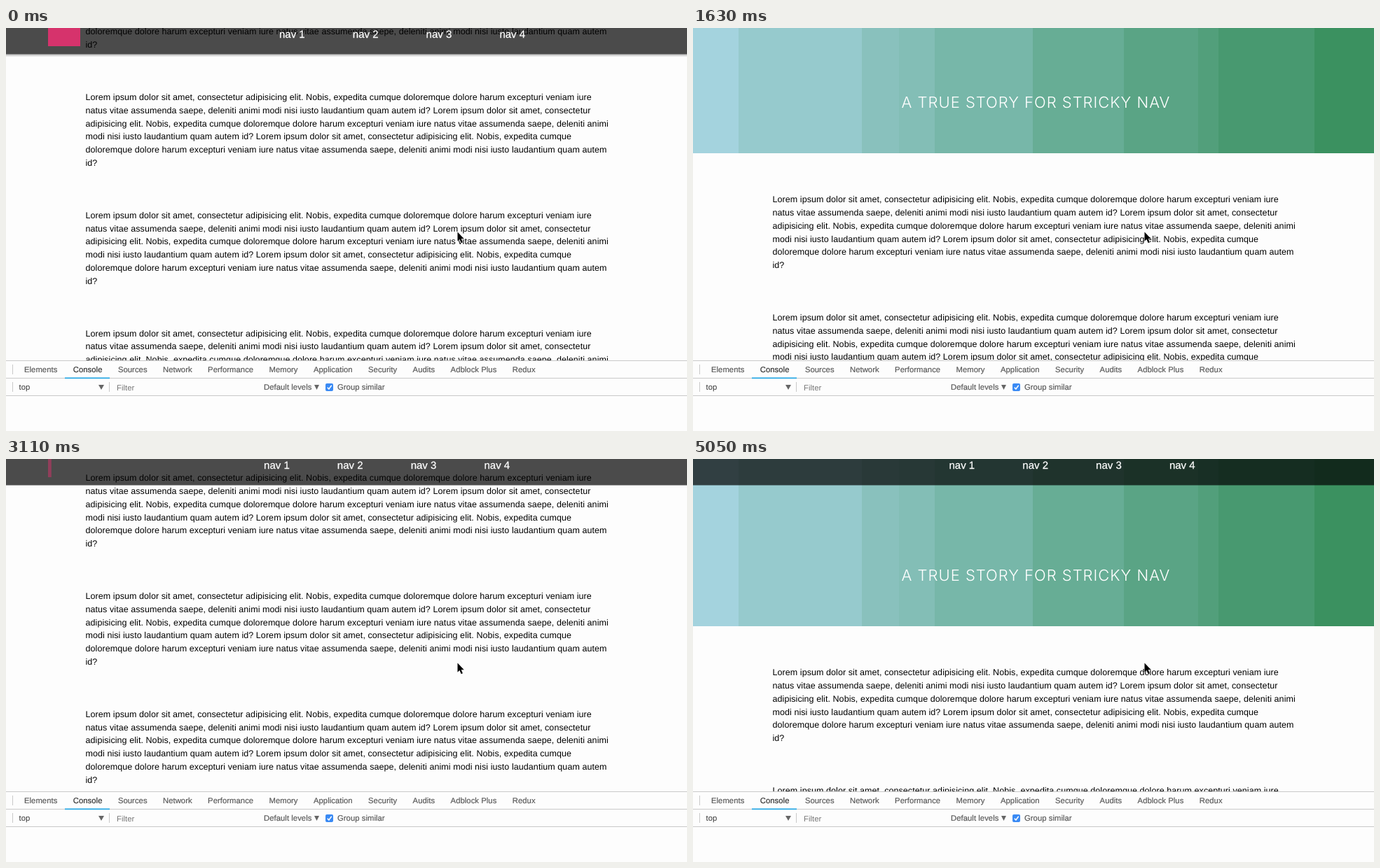
Write an HTML page that moves like this. It is 972 by 576 pixels and loops after 5.49 s.

```html
<!DOCTYPE html>
<html lang="en">
<head>
<meta charset="utf-8">
<title>Sticky nav</title>
<style>
  html, body { margin: 0; width: 100%; height: 100%; overflow: hidden; background: #fdfdfd; }
  svg { display: block; width: 972px; height: 576px; }
  text { font-family: "Liberation Sans", Arial, sans-serif; text-rendering: geometricPrecision; }
  .copy { font-size: 12.5px; letter-spacing: .07px; fill: #000; }
  .title { font: 300 22px Inter, Roboto, sans-serif; letter-spacing: 1px; fill: #fff; }
  .link { font-size: 15px; fill: #fff; stroke: #fff; stroke-width: .25; }
  .tool { font-size: 11.25px; letter-spacing: .06px; fill: #5a5a5a; stroke: #5a5a5a; stroke-width: .2; }
  .tool .on { fill: #333; stroke: #333; }
  .plain { fill: #333; stroke: none; }
  .hint { fill: #757575; stroke: none; }
</style>
</head>
<body>
<svg viewBox="0 0 972 576">
  <defs>
    <linearGradient id="fade" x2="0" y2="1">
      <stop stop-color="#000" stop-opacity=".28"/>
      <stop offset="1" stop-color="#000" stop-opacity="0"/>
    </linearGradient>
  </defs>
  <rect width="972" height="576" fill="#fdfdfd"/>
  <g id="page">
    <g id="hero" shape-rendering="crispEdges"></g>
    <text class="title" x="297.5" y="174">A TRUE STORY FOR STRICKY NAV</text>
    <g id="copy"></g>
  </g>
  <g id="nav">
    <rect id="shadow" y="37.5" width="972" height="4" fill="url(#fade)"/>
    <rect y="-20" width="972" height="57.5" fill="#000" fill-opacity=".7"/>
    <rect id="logo" x="60" y="-20" height="46" fill="#d6336c"/>
    <g id="links"></g>
  </g>
  <rect y="475" width="972" height="101" fill="#fdfdfd"/>
  <path d="M0 475.5H972M0 500.5H972M0 525.5H972M9.5 481V495M9.5 506V520M147.5 506V520" stroke="#c9c9c9"/>
  <rect x="84" y="499.5" width="64" height="1.7" fill="#22a5e3"/>
  <path d="M132 510h8l-4 7zM440 510h7l-3.5 7z" fill="#666"/>
  <rect x="456" y="508" width="11" height="11" rx="2" fill="#3a8af4"/>
  <path d="M458.7 513.7l2.2 2.3 3.8-5.2" fill="none" stroke="#fff" stroke-width="1.5"/>
  <text id="tabs" class="tool" x="26" y="492"></text>
  <text class="tool plain" x="18.5" y="517">top</text>
  <text class="tool hint" x="158" y="517.5">Filter</text>
  <text class="tool" x="368" y="517">Default levels</text>
  <text class="tool" x="473" y="517">Group similar</text>
  <path d="M644.5 291.5v13.2l2.9-2.7 2.3 5.2 2.2-1-2.2-5h4z" stroke="#fff" paint-order="stroke"/>
</svg>
<script>
const LOOP = 5490, BEAT = 150;
const FIX_AT = 239;                     // scroll at which the nav sticks
const OPEN_AT = 3075, OPEN_TIME = 335;  // when the logo starts to open
const LINE = 18.75;
const $ = id => document.getElementById(id);

function add(parent, tag, attrs, text) {
  const el = document.createElementNS('http://www.w3.org/2000/svg', tag);
  for (const k in attrs) el.setAttribute(k, attrs[k]);
  if (text) el.textContent = text;
  $(parent).append(el);
}

// Hero: a stepped gradient, each band coloured by its centre
const LEFT = [168, 213, 227], RIGHT = [54, 142, 90];
[0, 65, 241, 294, 345, 485, 615, 721, 750, 887].forEach((x, i, edges) => {
  const end = edges[i + 1] || 972;
  const p = (x + end) / 2 / 972;
  const rgb = LEFT.map((v, c) => Math.round(v + (RIGHT[c] - v) * p));
  add('hero', 'rect', { x, y: -20, width: end - x, height: 259, fill: `rgb(${rgb})` });
});

const LOREM = 'Lorem ipsum dolor sit amet, consectetur';
const NOBIS = 'adipisicing elit. Nobis, expedita cumque';
const DOLOR = 'doloremque dolore harum excepturi veniam iure';
const NATUS = 'natus vitae assumenda saepe, deleniti animi';
const MODI = 'modi nisi iusto laudantium quam autem';
const LINES = [
  `${LOREM} ${NOBIS} ${DOLOR}`,
  `${NATUS} ${MODI} id? ${LOREM}`,
  `${NOBIS} ${DOLOR} ${NATUS}`,
  `${MODI} id? ${LOREM} ${NOBIS}`,
  `${DOLOR} ${NATUS} ${MODI}`,
  'id?'
];
for (let k = 0; k < 5; k++) {
  LINES.forEach((line, i) => add('copy', 'text',
    { class: 'copy', x: 113.5, y: Math.round(309.4 + LINE * (9 * k + i)) }, line));
}

for (let i = 0; i < 4; i++) {
  add('links', 'text', { class: 'link', x: 365.5 + 104.8 * i, y: 14 }, `nav ${i + 1}`);
}

['Elements', 'Console', 'Sources', 'Network', 'Performance', 'Memory', 'Application', 'Security',
 'Audits', 'Adblock Plus', 'Redux'].forEach((name, i) =>
  add('tabs', 'tspan', { dx: i ? 22.4 : 0, class: name === 'Console' ? 'on' : '' }, name));

const glide = u => u ** 3 * (10 - 15 * u + 6 * u * u);
const settle = u => 1 - (1 - u) ** 1.855;

// Scroll moves, each going on from where the last one ended
const MOVES = [
  { start: 0, end: 580, to: 328, ease: glide },
  { start: 730, end: 2230, to: 0, ease: settle },
  { start: 2380, end: 3410, to: 328, ease: glide },
  { start: 3700, end: 4000, to: 282, ease: glide },
  { start: 4150, end: 5050, to: 0, ease: glide }
];
MOVES.forEach((m, i) => m.from = i ? MOVES[i - 1].to : 375);

function draw(t) {
  const { start, end, from, to, ease } = MOVES.findLast(m => m.start <= t);
  // Hold the picture on beats counted back from the end of the move
  const beats = Math.max(0, Math.ceil((end - t) / BEAT));
  const time = Math.max(start, end - beats * BEAT);
  const scroll = Math.round(from + (to - from) * ease((time - start) / (end - start)));

  const fixed = scroll > FIX_AT;
  const since = (time - OPEN_AT + LOOP) % LOOP;
  const open = fixed ? Math.min(1, since / OPEN_TIME) : 0;

  $('page').setAttribute('transform', `translate(0 ${-scroll})`);
  $('nav').setAttribute('transform', `translate(0 ${fixed ? 0 : -scroll})`);
  $('links').setAttribute('transform', `translate(${24.5 * open} 0)`);
  $('logo').setAttribute('width', 46 * open);
  $('logo').setAttribute('opacity', Math.min(1, .4 + open));
  $('shadow').setAttribute('opacity', open);
}

const begin = performance.now();
function tick() {
  draw((performance.now() - begin) % LOOP);
  requestAnimationFrame(tick);
}
tick();
</script>
</body>
</html>
```
